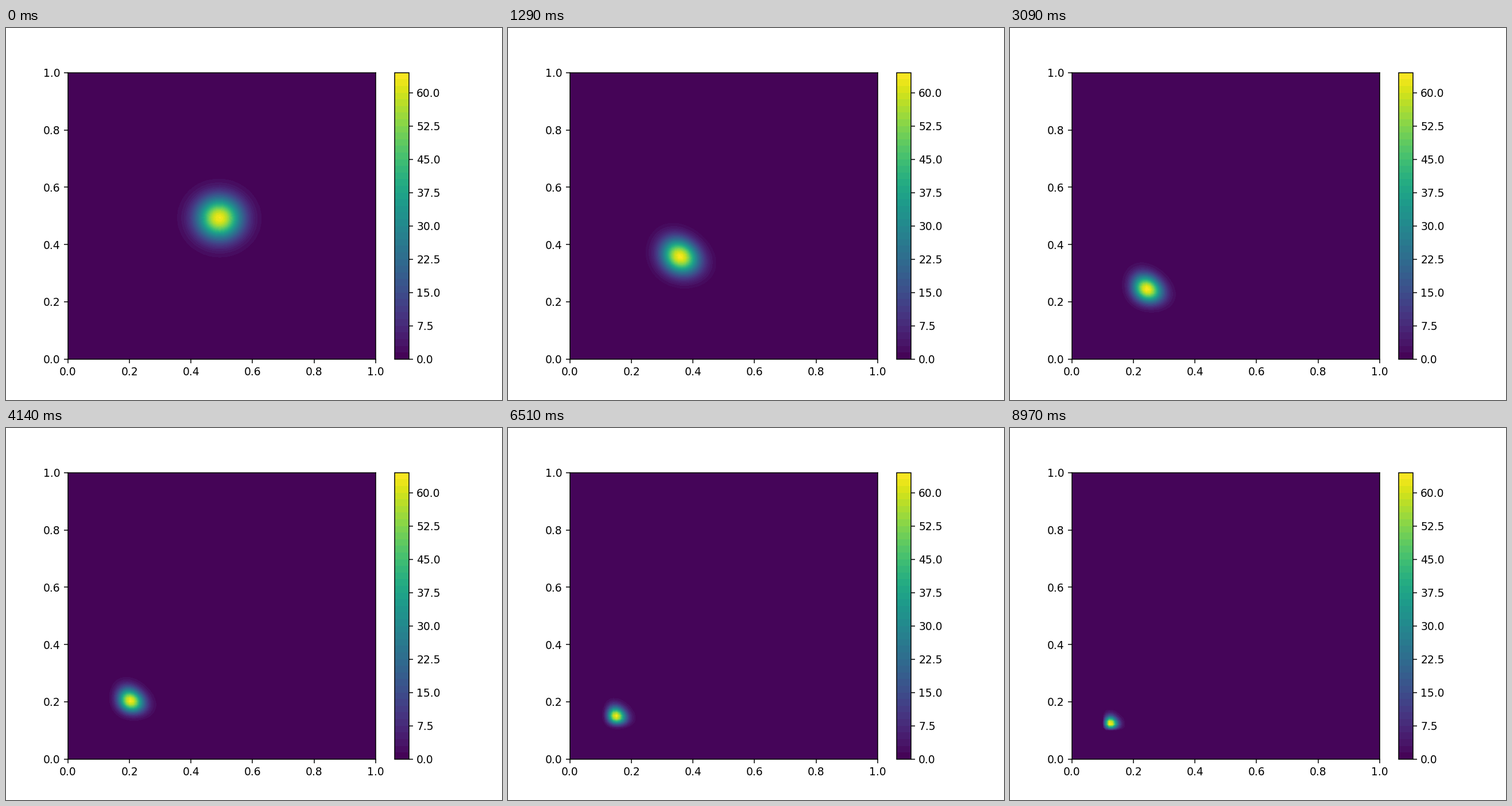
A matplotlib script for the animation above (9 s loop, 864 by 648 pixels).

```python
import numpy as np
import matplotlib.pyplot as plt
from matplotlib.animation import FuncAnimation

N = 100            # grid nodes per axis
FRAMES = 300
INTERVAL = 30      # ms
DT = 0.01
TARGET = 0.1       # point that attracts the density
CENTER, SIGMA = 0.5, 0.05
LEVELS = 50

x = np.linspace(0, 1, N)
dx = x[1] - x[0]
X, Y = np.meshgrid(x, x)
vel = TARGET - x


def advect(u):
    """Upwind v * du/dx along the last axis, plus the u * dv/dx term."""
    pad = np.pad(u, ((0, 0), (1, 1)))
    back = u - pad[:, :-2]
    ahead = pad[:, 2:] - u
    return vel * np.where(vel > 0, back, ahead) / dx - u


def step(u):
    return u - DT * (advect(u) + advect(u.T).T)


def evolve(u, count):
    fields = []
    for _ in range(count):
        u = step(u)
        fields.append(np.maximum(u, 0))
    return fields


r2 = (X - CENTER) ** 2 + (Y - CENTER) ** 2
start = np.exp(-r2 / (2 * SIGMA ** 2)) / (2 * np.pi * SIGMA ** 2)
# the first picture shows the state after two steps
fields = evolve(start, FRAMES + 1)[1:]

fig, ax = plt.subplots(figsize=(6.4, 4.8), dpi=135)
shown = [ax.contourf(X, Y, start, levels=LEVELS)]
fig.colorbar(shown[0], ax=ax)
ax.set(xlim=(0, 1), ylim=(0, 1))


def update(i):
    shown[0].remove()
    shown[0] = ax.contourf(X, Y, fields[i], levels=LEVELS)
    return shown


anim = FuncAnimation(fig, update, frames=FRAMES, interval=INTERVAL,
                     init_func=lambda: shown, repeat=True, repeat_delay=0)
plt.show()
```
